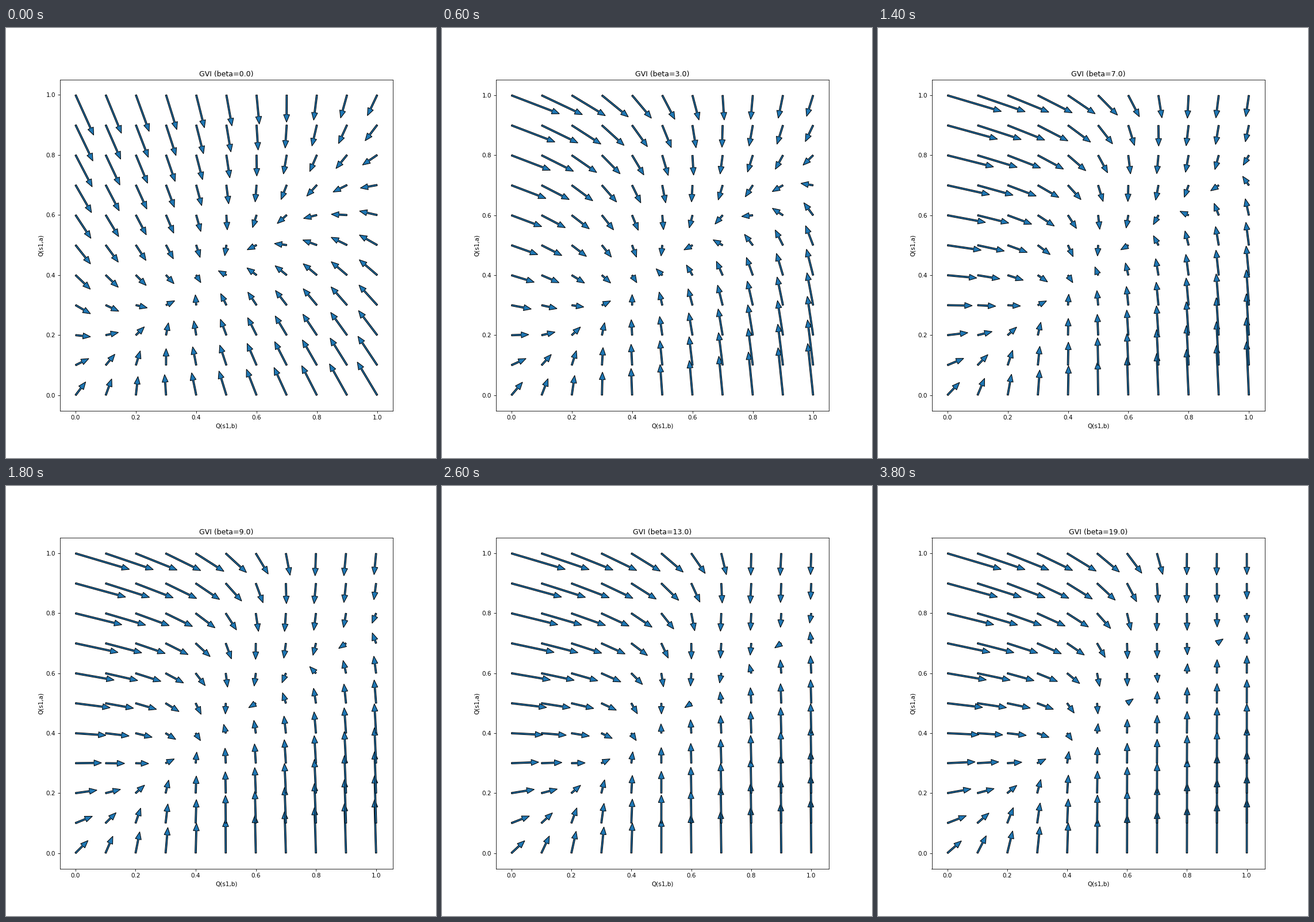
Write a matplotlib script that moves like this. It is 748 px wide and 748 px high and loops after 4 s.

```python
import matplotlib.pyplot as plt
import numpy as np
from matplotlib.animation import FuncAnimation

SIZE, INCHES = 748, 10
FRAMES, INTERVAL = 20, 200
GAMMA = 0.98
REWARD = {"a": 0.122, "b": 0.033}
STAY = {"a": 0.66, "b": 0.99}  # chance of remaining in s1; the other state is terminal
STEP = 0.2
GRID = np.linspace(0, 1, 11)
ARROW = dict(width=0.005, head_width=0.02, head_length=0.025,
             facecolor="C0", edgecolor="black")


def boltzmann(qa, qb, beta):
    """Softmax-weighted mean of the two action values."""
    weight = 1 / (1 + np.exp(-beta * (qa - qb)))
    return weight * qa + (1 - weight) * qb


def backup(action, qa, qb, beta):
    return REWARD[action] + GAMMA * STAY[action] * boltzmann(qa, qb, beta)


def sweep(qa, qb, beta):
    """One in-place value iteration sweep: a first, then b with the new a."""
    new_a = backup("a", qa, qb, beta)
    new_b = backup("b", new_a, qb, beta)
    return new_a, new_b


fig, ax = plt.subplots(figsize=(INCHES, INCHES), dpi=SIZE / INCHES)


def draw(i):
    beta = float(i)
    ax.clear()
    for qa in GRID:
        for qb in GRID:
            new_a, new_b = sweep(qa, qb, beta)
            ax.arrow(qb, qa, STEP * (new_b - qb), STEP * (new_a - qa), **ARROW)
    ax.set_title(f"GVI (beta={beta:.1f})")
    ax.set_xlabel("Q(s1,b)")
    ax.set_ylabel("Q(s1,a)")
    return ax.patches


anim = FuncAnimation(fig, draw, frames=FRAMES, interval=INTERVAL, repeat=True)
plt.show()
```
